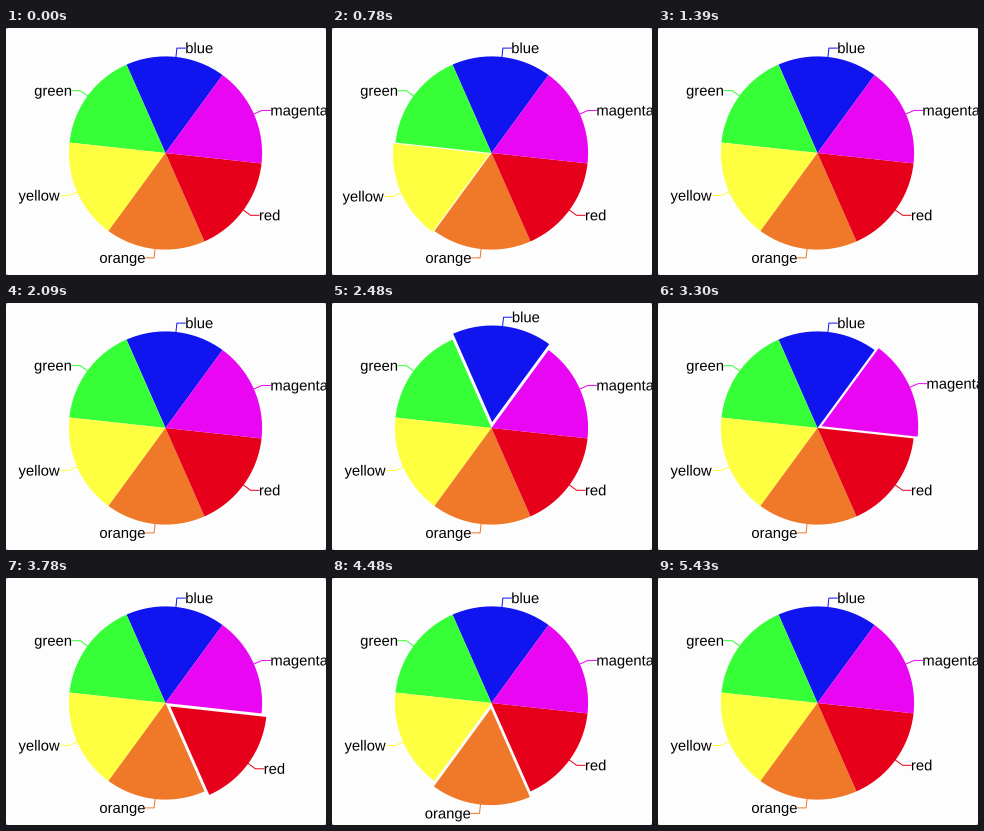
These frames come from a looping animation (320 px wide and 247 px high, 5.47 s). A matplotlib script:

```python
import numpy as np
import matplotlib.pyplot as plt
from matplotlib.animation import FuncAnimation
from matplotlib.lines import Line2D
from matplotlib.patches import FancyBboxPatch, PathPatch, Wedge
from matplotlib.textpath import TextPath
from matplotlib.transforms import Affine2D

W, H, DPI = 320, 247, 100
LOOP, STEP = 5470, 10            # ms
FIRST, TICK = 90, 130 / 3        # ms, opening hold and pace of the motion
CENTER = np.array([159.5, H - 125.0])
RADIUS, ELBOW, TAIL, GAP = 96.6, 105.5, 8.4, 0.9
PULL = 6.3                       # px, farthest a slice moves out
PX = 72 / DPI

# name, colour, start angle, time it starts to move, time it is back
SLICES = [
    ("blue", "#1015f0", 53.8, 2090, 2720),
    ("green", "#36ff38", 113.8, 1385, 2090),
    ("yellow", "#ffff42", 173.8, 660, 1385),
    ("orange", "#f07829", 233.8, 4225, 4930),
    ("red", "#e6001a", 293.8, 3490, 4225),
    ("magenta", "#e906f2", 353.8, 2720, 3490),
]

fig = plt.figure(figsize=(W / DPI, H / DPI), dpi=DPI, facecolor="#b4b4b4")
ax = fig.add_axes([0, 0, 1, 1])
ax.set_xlim(0, W)
ax.set_ylim(0, H)
ax.axis("off")
ax.add_patch(FancyBboxPatch((0, 0), W, H, lw=0, fc="#fefdfe",
                            boxstyle="round,pad=0,rounding_size=3"))


def label_path(text, x, y, side):
    path = TextPath((0, 0), text, size=14.8, prop={"family": "Liberation Sans"})
    box = path.get_extents()
    dx = x + GAP - box.x0 if side > 0 else x - GAP - box.x1
    return path.transformed(Affine2D().translate(dx, y - 5))


class Slice:
    def __init__(self, name, color, angle, start, end):
        self.start, self.end = start, end
        mid = np.radians(angle + 30)
        self.dir = np.array([np.cos(mid), np.sin(mid)])
        self.shift = Affine2D()
        side = np.sign(self.dir[0])

        edge = CENTER + RADIUS * self.dir
        bend = CENTER + ELBOW * self.dir
        tip = bend + [side * TAIL, 0]
        wedge = Wedge(CENTER, RADIUS, angle, angle + 60, fc=color, lw=0)
        leader = Line2D(*zip(edge, bend, tip), color=color, lw=PX)
        label = PathPatch(label_path(name, *tip, side), fc="black", lw=0)
        self.parts = [wedge, leader, label]
        for part in self.parts:
            part.set_transform(self.shift + ax.transData)
            ax.add_artist(part)

    def move(self, t):
        phase = np.clip((t - self.start) / (self.end - self.start), 0, 1)
        self.shift.clear().translate(*(PULL * np.sin(np.pi * phase) * self.dir))


slices = [Slice(*spec) for spec in SLICES]


def update(i):
    t = i * STEP
    t = 0 if t < FIRST else FIRST + TICK * np.floor((t - FIRST) / TICK + 1e-6)
    for s in slices:
        s.move(t)
    return [part for s in slices for part in s.parts]


anim = FuncAnimation(fig, update, frames=LOOP // STEP, interval=STEP,
                     repeat=True, repeat_delay=0, blit=False)
plt.show()
```
